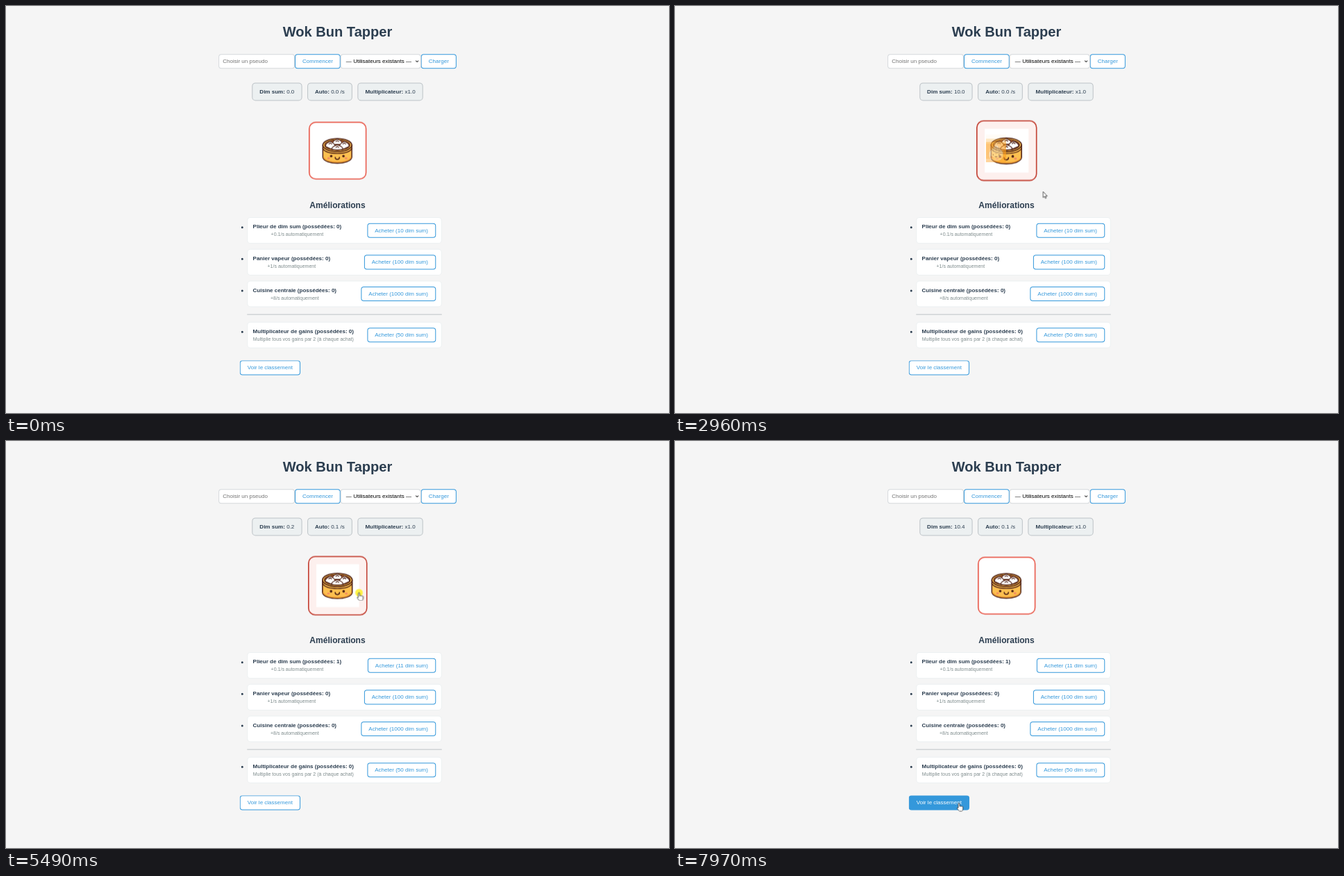
Animation of 955 by 586 pixels, one loop 8000 ms. Source, as an HTML page:

```html
<!DOCTYPE html>
<html lang="fr">
<head>
<meta charset="utf-8">
<title>Wok Bun Tapper</title>
<style>
  html, body { margin: 0; width: 100%; height: 100%; overflow: hidden; background: #f5f5f5; }
  * { box-sizing: border-box; }
  #page {
    position: absolute; left: 0; top: 0; width: 1903px; height: 1168px;
    transform: scale(.50184); transform-origin: 0 0;
    font: 16px/18px "Liberation Sans", Arial, sans-serif; color: #2c3e50; white-space: nowrap;
  }
  h1, h2, .row { position: absolute; left: 0; width: 100%; margin: 0; text-align: center; }
  h1 { top: 51px; font-size: 40px; line-height: 46px; }
  h2 { top: 557px; font-size: 24px; line-height: 28px; }
  .row { display: flex; justify-content: center; }
  .field {
    height: 42px; padding: 10px; border: 2px solid #d5d9dc; border-radius: 8px;
    background: #fff; color: #757575; text-align: left; position: relative;
  }
  .select { width: 231px; padding-left: 14px; color: #000; }
  .select svg { position: absolute; right: 4px; top: 15px; }
  .btn {
    height: 42px; padding: 10px 20px; border: 2px solid #3498db; border-radius: 8px;
    background: #fff; color: #3498db;
  }
  .pills { top: 219.5px; gap: 15px; }
  .pills div {
    height: 52px; padding: 15px 20px; border: 2px solid #bdc3c7; border-radius: 10px; background: #ecf0f1;
  }
  #dish {
    position: absolute; left: 868.5px; top: 331.5px; width: 166px; height: 166px; padding: 20px;
    border: 3px solid #e74c3c; border-radius: 20px; background: #fff;
  }
  #dish svg { display: block; width: 120px; height: 120px; background: #fff; }
  ul { position: absolute; left: 691.5px; top: 605.5px; width: 559px; margin: 0; padding: 0; list-style: none; }
  li {
    position: relative; display: flex; justify-content: space-between; align-items: center;
    height: 76px; margin-bottom: 15px; padding: 15px; border: 2px solid #ecf0f1; border-radius: 10px;
    background: #fff; text-align: center;
  }
  li::before {
    content: ""; position: absolute; left: -19px; top: 24px; width: 6px; height: 6px;
    border-radius: 50%; background: #2c3e50;
  }
  small { display: block; margin-top: 5px; font-size: 14px; line-height: 16px; color: #7f8c8d; }
  hr { height: 2px; margin: 20px 0; border: 0; background: #bdc3c7; }
  #rank { position: absolute; left: 671px; top: 1017px; }

  .pop { position: absolute; top: 190px; width: 35px; height: 35px; opacity: 0; animation: pop 8s linear infinite; }
  @keyframes pop {
    0% { opacity: 1; transform: none; }
    .6% { opacity: .95; transform: none; }
    2.6% { opacity: .45; transform: translateY(3px) scale(.83); }
    7.5% { opacity: 0; transform: translateY(-9px) scale(.83); }
    100% { opacity: 0; transform: none; }
  }
  #cursor { position: absolute; left: 0; top: 0; width: 12px; height: 14px; overflow: visible; }
  #cursor path { fill: #fff; stroke: #333; stroke-width: .8; stroke-linejoin: round; }
  #glow { fill: #fdf01c; opacity: 0; }
</style>
</head>
<body>
<div id="page">
  <h1>Wok Bun Tapper</h1>
  <div class="row" style="top:137.5px">
    <div class="field" style="width:219px">Choisir un pseudo</div>
    <div class="btn">Commencer</div>
    <div class="field select">— Utilisateurs existants —
      <svg width="10" height="8" fill="none" stroke="#333" stroke-width="2"><path d="M1 1.5L5 5.5L9 1.5"/></svg>
    </div>
    <div class="btn">Charger</div>
  </div>
  <div class="row pills">
    <div><b>Dim sum:</b> <span id="total">0.0</span></div>
    <div><b>Auto:</b> <span id="auto">0.0</span> /s</div>
    <div><b>Multiplicateur:</b> x1.0</div>
  </div>
  <div id="dish">
    <svg viewBox="447.5 178 60 60" stroke="#4d2015" stroke-width="1.5" stroke-linecap="round" stroke-linejoin="round">
      <path fill="#fdc050" d="M456.2 200V217.5C457 223 467 226 477 226S497 223 497.8 217.5V200"/>
      <path fill="none" stroke="#ee9d35" d="M457.5 218C460 222.5 468 224.4 477 224.4S494 222.5 496.5 218"/>
      <path fill="none" stroke-width="1.2" d="M456.2 205C459 210 468 212 477 212S495 210 497.8 205"/>
      <ellipse cx="477" cy="200" rx="20.8" ry="9.3" fill="#fdc050"/>
      <ellipse cx="477" cy="200" rx="18" ry="7.2" fill="#b9652a" stroke-width="1.1"/>
      <g fill="#fff" stroke-width="1.1">
        <path d="M470 199C470 193.500 474 193 477 191.500C480 193 484 193.500 484 199Z"/>
        <path d="M460 202C460 197 464 197 467 194.500C470 197 474 197 474 203L468 205.500Z"/>
        <path d="M494 202C494 197 490 197 487 194.500C484 197 480 197 480 203L486 205.500Z"/>
        <path d="M469 206C469 201.500 474 201.500 477 199.500C480 201.500 485 201.500 485 206Q477 208 469 206Z"/>
        <path fill="none" d="M475 195L477 193.500L479 195M465 198.500L467 196.800L469 198.500M485 198.500L487 196.800L489 198.500M475 203.500L477 201.800L479 203.500"/>
      </g>
      <g stroke="none">
        <path fill="#f48a62" d="M462.500 219a2 1.400 0 1 0 4 0a2 1.400 0 1 0 -4 0M487.500 219a2 1.400 0 1 0 4 0a2 1.400 0 1 0 -4 0"/>
        <g fill="#4d2015"><circle cx="468.200" cy="215.800" r="1.800"/><circle cx="485.800" cy="215.800" r="1.800"/></g>
      </g>
      <path fill="none" d="M474 217.500a3 3 0 0 0 6 0"/>
    </svg>
  </div>
  <h2>Améliorations</h2>
  <ul>
    <li><div><b>Plieur de dim sum (possédées: <span id="owned">0</span>)</b><small>+0.1/s automatiquement</small></div>
      <div class="btn" id="buy">Acheter (<span id="price">10</span> dim sum)</div></li>
    <li><div><b>Panier vapeur (possédées: 0)</b><small>+1/s automatiquement</small></div>
      <div class="btn">Acheter (100 dim sum)</div></li>
    <li><div><b>Cuisine centrale (possédées: 0)</b><small>+8/s automatiquement</small></div>
      <div class="btn">Acheter (1000 dim sum)</div></li>
    <hr>
    <li><div><b>Multiplicateur de gains (possédées: 0)</b><small>Multiplie tous vos gains par 2 (à chaque achat)</small></div>
      <div class="btn">Acheter (50 dim sum)</div></li>
  </ul>
  <div class="btn" id="rank">Voir le classement</div>
</div>

<svg width="0" height="0" style="position:absolute">
  <symbol id="bun" viewBox="0 0 35 35">
    <path fill="#ff9f1f" d="M0 0H35V35H0Z"/>
    <path fill="#ffb545" d="M0 0H35V3H0Z"/>
    <path fill="#ffe3ab" stroke="#d9913f" stroke-width=".8" d="M5 22C5 14 12 12 14 8Q17.500 4 21 8C23 12 30 14 30 22C30 29 25 33 17.500 33S5 29 5 22Z"/>
    <path fill="none" stroke="#d9a255" stroke-width=".8" d="M17.500 7V15M14.500 9Q14 13 10.500 16M20.500 9Q21 13 24.500 16"/>
    <path fill="#f7a58a" d="M8 25h4v2h-4zM23 25h4v2h-4z"/>
    <path fill="none" stroke="#6d5148" stroke-linecap="round" stroke-width="1.500" d="M12.500 21.500v1M22.500 21.500v1M16 25q1.500 1.500 3 0"/>
  </symbol>
</svg>
<div id="pops"></div>
<svg id="cursor">
  <circle id="glow" r="5.500"/>
  <path id="arrow" d="M0 0V8.600L2 6.800L3.300 9.800L4.600 9.200L3.400 6.400H6Z"/>
  <path id="hand" transform="translate(-3 0)" d="M2 7V1a1 1 0 0 1 2 0V4.500a.9.9 0 0 1 1.700.2a.9.9 0 0 1 1.600.4a.8.8 0 0 1 1.500.5V8C8.800 10 8 11.500 6.500 11.500H4.500C3 11.500 1.500 9 .4 7.400C0 6.600 1 6 2 7Z"/>
</svg>

<script>
  const LOOP = 8000, BUY = 3400;
  const $ = id => document.getElementById(id);
  const first = [1030, 1230, 1430, 1630, 1830, 2020, 2210, 2400, 2590, 2750];
  const second = Array.from({ length: 10 }, (_, i) => 5570 + 160 * i);
  const ticks = [4160, 5160, 6160, 7160];

  const play = (el, keys) => el.animate(
    keys.map(([at, style, easing = 'linear']) => ({ offset: at / LOOP, easing, ...style })),
    { duration: LOOP, iterations: Infinity });

  // Fades from one style to another during each [start, end] span.
  const hover = (el, off, on, spans, fade) => play(el, [
    [0, off],
    ...spans.flatMap(([a, b]) => [[a, off], [a + fade, on], [b, on], [Math.min(b + fade, LOOP), off]])
  ]);

  const scale = s => ({ transform: `scale(${s})` });
  const press = (clicks, enter, leave) => [
    [enter, scale(1)], [enter + 100, scale(1.05)],
    ...clicks.flatMap((c, i) => [
      [c - (i ? 90 : 120), scale(i ? 1.02 : 1.05)], [c, scale(.98)], [c + 30, scale(.98)]
    ]),
    [clicks[9] + 130, scale(1.05)], [leave, scale(1.05)], [leave + 200, scale(1)]
  ];
  play($('dish'), [[0, scale(1)], ...press(first, 800, 2960), ...press(second, 4700, 7150), [LOOP, scale(1)]]);
  hover($('dish'),
    { borderColor: '#e74c3c', backgroundColor: '#fff' },
    { borderColor: '#c0392b', backgroundColor: '#fdf0ee' },
    [[800, 2960], [4700, 7150]], 150);

  const plain = { backgroundColor: '#fff', color: '#3498db' };
  const filled = { backgroundColor: '#3498db', color: '#fff' };
  hover($('buy'), plain, filled, [[3150, 3600]], 120);
  play($('rank'), [[0, plain], [7560, plain], [7700, filled], [LOOP, filled]]);

  const at = (x, y) => ({ transform: `translate(${x}px, ${y}px)` });
  play($('cursor'), [
    [0, at(894, 509)], [240, at(894, 509), 'ease-in-out'], [940, at(462.5, 219)],
    [2760, at(462.5, 219)], [2960, at(530, 267)], [3200, at(585, 324), 'ease-out'],
    [3480, at(587, 330)], [3580, at(587, 319)], [3660, at(585, 302), 'ease-in-out'],
    [4350, at(545, 256)], [4780, at(508.5, 218.5)], [7050, at(508.5, 218.5), 'ease-in-out'],
    [7600, at(409, 526)], [7760, at(409, 521.5)], [LOOP, at(409, 521.5)]
  ]);

  const lit = o => ({ opacity: o });
  play($('glow'), [
    [0, lit(0)],
    ...[...first, BUY, ...second].flatMap(c => [[c - 95, lit(0)], [c - 85, lit(.8)], [c, lit(.8)], [c + 50, lit(0)]]),
    [LOOP, lit(0)]
  ]);

  const addPop = x => c => $('pops').insertAdjacentHTML('beforeend',
    `<svg class="pop" style="left:${x - 17.5}px;animation-delay:${c}ms"><use href="#bun"/></svg>`);
  first.forEach(addPop(462.5));
  second.forEach(addPop(508.5));

  const set = (id, text) => { if ($(id).textContent !== text) $(id).textContent = text; };
  const show = (id, on) => { $(id).style.visibility = on ? 'visible' : 'hidden'; };
  const pointing = [[860, 2800], [3150, 3600], [4700, 7120], [7540, LOOP]];
  const start = performance.now();

  function tick() {
    const t = (performance.now() - start) % LOOP;
    const past = list => list.filter(c => c <= t).length;
    const bought = t >= BUY;
    const over = pointing.some(([a, b]) => t >= a && t < b);
    set('total', (bought ? past(second) + past(ticks) / 10 : past(first)).toFixed(1));
    set('auto', bought ? '0.1' : '0.0');
    set('owned', bought ? '1' : '0');
    set('price', bought ? '11' : '10');
    show('hand', over);
    show('arrow', !over && t >= 240);
    requestAnimationFrame(tick);
  }
  tick();
</script>
</body>
</html>
```
